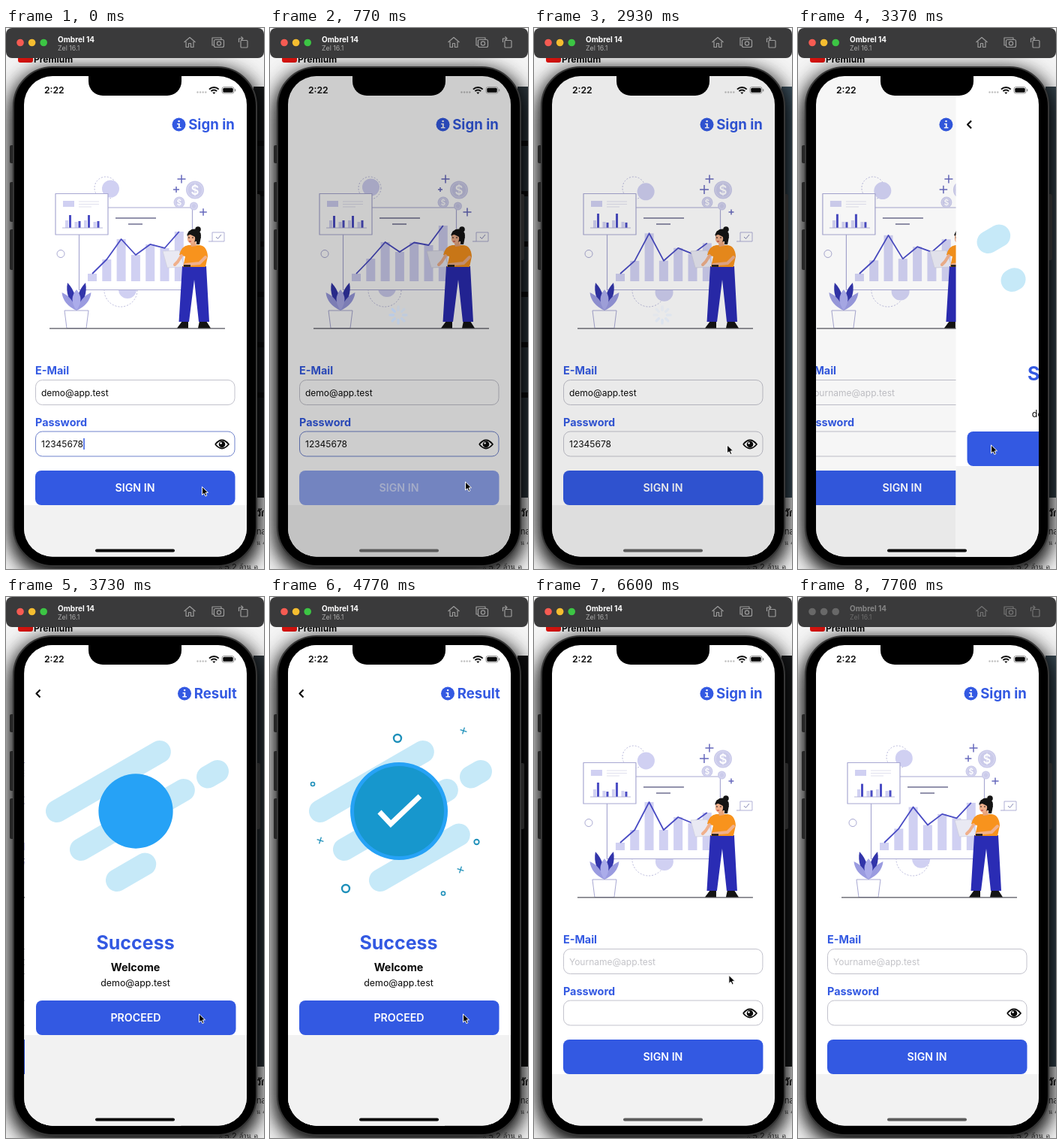
An HTML page with a canvas that plays this animation: 344x720 px, repeating every 7.73 s.

```html
<!DOCTYPE html>
<html lang="en">
<head>
<meta charset="utf-8">
<title>Sign in flow</title>
<style>
html, body { margin: 0; width: 100%; height: 100%; overflow: hidden; background: #e8e8e8; }
canvas { display: block; width: 344px; height: 720px; }
</style>
</head>
<body>
<canvas id="stage"></canvas>
<script>
const W = 344, H = 720, LOOP = 7730;
const SANS = 'Inter, "Noto Sans", sans-serif';
const BLUE = '#3359e2', LINE = '#a8a8d2', LILAC = '#d0d0f2', INDIGO = '#4a4cc4';
const SKY = '#c6e9f8', TEAL = '#1f90ba', INK = '#0a0a0a', PAPER = '#fff';
const PUSH = 3300, POP = 6089;
const canvas = document.getElementById('stage');
const c = canvas.getContext('2d');
const dpr = window.devicePixelRatio || 1;
canvas.width = W * dpr;
canvas.height = H * dpr;

const mix = (a, b, p) => a + (b - a) * p;
const linear = (t, a, b) => Math.max(0, Math.min(1, (t - a) / (b - a)));
const span = (t, a, b) => { const p = linear(t, a, b); return p * p * (3 - 2 * p); };
const dip = (t, a, b) => span(t, a, a + 160) - span(t, b, b + 250);
// critically damped spring, stiffness 1000 and mass 3
const spring = ms => { const k = Math.max(0, ms) / 1000 * Math.sqrt(1000 / 3); return 1 - (1 + k) * Math.exp(-k); };

function paint(fill, stroke, width = 1) {
  if (fill) { c.fillStyle = fill; c.fill(); }
  if (stroke) { c.strokeStyle = stroke; c.lineWidth = width; c.stroke(); }
}
function poly(pts, fill, stroke, width) {
  c.beginPath();
  pts.forEach(p => c.lineTo(p[0], p[1]));
  if (fill) c.closePath();
  paint(fill, stroke, width);
}
function rect(x, y, w, h, fill) {
  c.fillStyle = fill;
  c.fillRect(x, y, w, h);
}
function box(x, y, w, h, r, fill, stroke, width) {
  c.beginPath();
  c.roundRect(x, y, w, h, r);
  paint(fill, stroke, width);
}
function oval(x, y, rx, ry, fill) {
  c.beginPath();
  c.ellipse(x, y, rx, ry, 0, 0, 7);
  paint(fill);
}
function disc(x, y, r, fill, stroke, width) {
  c.beginPath();
  c.arc(x, y, Math.max(0, r), 0, 7);
  paint(fill, stroke, width);
}
function line(x1, y1, x2, y2, color, width = 1) {
  poly([[x1, y1], [x2, y2]], null, color, width);
}
function text(s, x, y, size, color, weight = 400, align = 'left') {
  c.font = `${weight} ${size}px ${SANS}`;
  c.fillStyle = color;
  c.textAlign = align;
  c.fillText(s, x, y);
}
function cross(x, y, r, color, width, turn = 0) {
  c.save();
  c.translate(x, y);
  c.rotate(turn);
  line(-r, 0, r, 0, color, width);
  line(0, -r, 0, r, color, width);
  c.restore();
}
function shifted(x, alpha, body) {
  c.save();
  c.translate(x, 0);
  c.globalAlpha *= alpha;
  body();
  c.restore();
}

function desktop(t) {
  rect(0, 0, W, H, '#f4f4f4');
  const light = 18 + 16 * Math.sin((t - 600) / 1035);
  rect(330, 78, 14, 547, `hsl(203,${light * .7}%,${light}%)`);
  if (t < 1300) for (let y = 150; y < 500; y += 67) rect(330, y, 14, 7, '#0c0c0c');
  box(16, 26, 20, 20, 3, '#d8140f');
  text('Premium', 37, 46, 12, INK, 700);
  text('วัก', 333, 650, 14, INK, 700);
  text('na', 334, 674, 11, '#333');
  text('น 4', 334, 688, 9, '#555');
  text('ะ 5.2 ล้าน ค', 284, 721, 11, '#333');
  c.save();
  c.shadowColor = 'rgba(0,0,0,.85)';
  c.shadowBlur = 28 * dpr;
  c.shadowOffsetY = 8 * dpr;
  box(10, 52, 324, 664, 52, '#000');
  box(10, 52, 324, 664, 52, '#000');
  c.restore();
  [[156, 24], [205, 53], [268, 54]].forEach(([y, h]) => box(5, y, 6, h, 2, '#262626'));
  box(333, 221, 6, 88, 2, '#262626');
  box(10, 52, 324, 664, 52, '#000', '#363636', 2);
}

function titleBar(t) {
  const active = t < 7450;
  const icon = active ? '#9c9c9c' : '#747474';
  const stroke = pts => poly(pts, null, icon, 1.2);
  box(0, 0, W, 40, 8, '#3a3a3b');
  ['#f65b52', '#f5bd30', '#3cc544'].forEach((col, i) => disc(19 + i * 15.6, 19.5, 4.8, active ? col : '#686868'));
  text('Ombrel 14', 69, 18.5, 10, active ? '#fff' : '#868686', 700);
  text('Zel 16.1', 69, 30, 8.8, active ? '#ababab' : '#6c6c6c');
  c.lineJoin = 'round';
  stroke([[237.5, 19], [245, 12.5], [252.5, 19]]);
  stroke([[240, 18], [240, 25.5], [243.5, 25.5], [243.5, 20.5], [246.5, 20.5], [246.5, 25.5], [250, 25.5], [250, 18]]);
  stroke([[277, 23], [275, 23], [275, 13], [287, 13], [287, 15]]);
  box(277.5, 15.5, 13, 10, 2, null, icon, 1.2);
  disc(284, 20.5, 2.6, null, icon, 1.2);
  box(313, 16.5, 9, 9.5, 1, null, icon, 1.2);
  stroke([[310.5, 19], [310.5, 14], [315, 14]]);
  stroke([[313.5, 11.5], [316, 14], [313.5, 16.5]]);
}

function page(foot) {
  rect(24, 60, 298, 650, PAPER);
  rect(24, foot, 298, 710 - foot, '#f2f2f2');
}

function heading(s, x) {
  disc(x, 128.5, 9, BLUE);
  rect(x - 1, 123, 2.2, 2.2, PAPER);
  rect(x - 2.4, 127, 3.4, 1.4, PAPER);
  rect(x - .6, 127, 1.8, 6, PAPER);
  rect(x - 2.6, 132, 5.6, 1.4, PAPER);
  text(s, x + 12.7, 135, 18.6, BLUE, 700);
}

function button(s, y, alpha) {
  shifted(0, alpha, () => {
    box(39, y, 266.5, 46, 8, BLUE);
    text(s, 172, y + 28, 14.2, PAPER, 600, 'center');
  });
}

function field(label, y, color, value, ink) {
  text(label, 39, y - 7, 14.4, BLUE, 700);
  box(39.5, y + .5, 265.5, 33, 9, null, color);
  text(value, 47, y + 21.5, 12, ink);
}

// a leaf grows from the pot at (94, 376)
function leaf(dx, dy, w, fill) {
  const n = Math.hypot(dx, dy), mx = 94 + dx * .6, my = 376 + dy * .55;
  const nx = -dy / n * w, ny = dx / n * w;
  c.beginPath();
  c.moveTo(94, 376);
  c.quadraticCurveTo(mx + nx, my + ny, 94 + dx, 376 + dy);
  c.quadraticCurveTo(mx - nx, my - ny, 94, 376);
  paint(fill);
}

function coin(x, y, r, sign) {
  disc(x, y, r, '#cbcbea');
  disc(x, y, r - 2, null, '#dedef4', .8);
  if (sign) text('$', x, y + r * .5, r * 1.4, PAPER, 600, 'center');
}

function person() {
  const skin = '#f0b08c', black = '#141414';
  poly([[209, 297], [231, 296], [238, 318], [215, 319]], '#e9e9f3', '#cfcfdf', .8);
  poly([[228, 399.5], [235, 390], [243, 390], [243, 399.5]], black);
  poly([[256, 399.5], [258, 390], [267, 390], [273, 399.5]], black);
  poly([[235, 317], [267, 317], [271, 391], [257, 391], [251, 335], [244, 391], [230.5, 391]], '#2a2cb4');
  c.beginPath();
  c.moveTo(243, 289);
  c.lineTo(258, 289);
  c.quadraticCurveTo(268, 290, 269, 304);
  c.lineTo(266, 318);
  c.lineTo(236, 318);
  c.lineTo(239, 304);
  c.lineTo(231, 302);
  c.quadraticCurveTo(234, 290, 243, 289);
  paint('#f8931d');
  c.lineCap = 'round';
  poly([[234, 303], [229, 311], [225, 315]], null, skin, 4);
  poly([[266, 305], [258, 313], [239, 315]], null, skin, 4);
  c.lineCap = 'butt';
  line(237, 316.5, 246, 316.5, black, 2.5);
  poly([[245, 283], [253, 283], [254, 290], [247, 291]], '#e9a57c');
  disc(256, 268, 3.8, black);
  oval(251, 276, 9, 8.5, black);
  poly([[254, 272], [260, 278], [258, 288], [254, 288]], black);
  oval(247, 280, 5.2, 6.8, skin);
  poly([[241, 276], [244, 270], [256, 273], [252, 278], [246, 275]], black);
  line(243, 279, 245, 279, black);
  line(248, 279, 250, 279, black);
  line(244, 284, 247, 284, '#b33');
}

function chartArt(t) {
  const sway = 1.5 * Math.sin(.34 + t * .0016) - .5;
  c.setLineDash([2, 2]);
  disc(133, 213, 15, null, LINE, .8);
  disc(153, 349, 22, null, LINE, .8);
  c.setLineDash([]);
  disc(139.5 - 5 * sway, 214 - 2 * sway, 11.5, LILAC);
  disc(162 - 6 * sway, 348 - 2 * sway, 12, LILAC);
  box(97.5, 239, 151, 109.5, 0, PAPER, LINE, 1.2);
  line(146, 253, 200, 253, '#6f6f90', 1.3);
  line(163, 261, 182, 261, '#6f6f90', 1.3);

  const heights = [10, 29, 56, 35, 49, 44, 66], gains = [0, 1, -4, 4, 2.5, 4, 8];
  const pts = heights.map((h, i) => [115 + i * 19.3, 337 - h - gains[i] * sway]);
  pts.forEach(([x, y]) => rect(x - 6, y, 12, 337 - y, LILAC));
  c.lineJoin = 'round';
  poly(pts, null, INDIGO, 1.8);

  box(66, 220.5, 70, 54.5, 0, PAPER, LINE, 1.2);
  rect(76, 230, 15, 8, LILAC);
  for (let i = 0; i < 3; i++) line(97, 231 + i * 3.5, i < 2 ? 124 : 114, 231 + i * 3.5, '#d9d9ea', .8);
  for (let i = 0; i < 4; i++) {
    const x = 79 + i * 12.5, h = i % 2 ? 9 + sway : 17 - sway;
    rect(x, 256 + i % 2 * 2, 4, 10 - i % 2 * 2, LILAC);
    rect(x + 5, 266 - h, 3, h, INDIGO);
  }
  line(75, 266, 129, 266, LINE, .8);

  coin(252, 215.5, 12, true);
  coin(231, 232, 7.5, true);
  coin(250.5, 237, 5.5, false);
  cross(234, 201, 5.5, '#6668bc', 1.5);
  cross(227, 215, 4 - sway, '#6668bc', 1.5);
  cross(263, 245, 4.8 + sway * .7, '#6668bc', 1.5);
  disc(73, 300.5, 5, null, LINE);
  box(275, 272, 16, 12, 0, null, LINE, .9);
  line(270, 284, 275, 284, LINE);
  poly([[280, 278], [282.5, 280.5], [287, 275]], null, '#8486b4');

  for (const side of [-1, 1]) {
    leaf(side * 12, -37, 9, '#3234aa');
    leaf(side * 19.5, -24, 8, '#9a9be0');
  }
  leaf(0, -28, 11, '#abacea');
  poly([[78, 376], [110, 376], [107, 399.5], [81, 399.5], [78, 376]], PAPER, LINE);
  line(58, 399.8, 292, 399.8, '#55555e', 1.2);
  person();
}

function eye() {
  c.beginPath();
  c.moveTo(279, 554);
  c.quadraticCurveTo(288, 543, 297, 554);
  c.quadraticCurveTo(288, 565, 279, 554);
  paint(null, INK, 1.8);
  disc(288, 554, 4.3, INK);
  disc(286.6, 552.6, 1.3, PAPER);
}

function signIn(t) {
  const filled = t < PUSH, focused = t < 1000;
  page(635);
  heading('Sign in', 230.5);
  chartArt(t);
  field('E-Mail', 468, '#c2c2cc', filled ? 'demo@app.test' : 'Yourname@app.test', filled ? INK : '#c3c3c8');
  field('Password', 536.5, focused ? '#6f82cc' : '#c2c2cc', filled ? '12345678' : '', INK);
  if (t < 500) line(104, 546, 104, 561, BLUE, 1.5);
  eye();
  button('SIGN IN', 589, 1 - .45 * dip(t, 590, 860));
}

// slanted pill that grows from its lower left end
function pill(x, y, length, p) {
  if (p <= 0) return;
  c.lineCap = 'round';
  line(x, y, x + length * .866 * p, y - length * .5 * p, SKY, 30);
  c.lineCap = 'butt';
}

function successArt(t) {
  const age = t - PUSH;
  pill(67, 285, 158, span(age, 0, 350));
  pill(99, 336, 158, span(age, 40, 390));
  pill(268, 239.5, 15, span(age, 100, 400));
  pill(147, 377, 121, span(age, 250, 700));
  disc(172, 285, 65 * span(age, 0, 630), '#26a2f6');
  disc(172, 285, 60 * span(age, 550, 900), '#1797cd');

  const p = linear(age, 850, 1000), q = linear(age, 1000, 1200);
  if (p > 0) {
    const pts = [[146, 286], [146 + 15 * p, 286 + 16 * p]];
    if (q > 0) pts.push([161 + 39 * q, 302 - 37 * q]);
    c.lineJoin = 'miter';
    poly(pts, null, PAPER, 7);
  }
  const pop = span(age, 700, 1100);
  if (pop <= 0) return;
  const place = (x, y) => [mix(172, x, pop), mix(285, y, pop)];
  [[170, 188, 5], [101, 388, 5], [57, 249, 2.5], [231, 394.5, 2.5], [275.5, 326, 3.2]]
    .forEach(([x, y, r]) => disc(...place(x, y), r * pop, null, TEAL, r * .3 + .9));
  [[258, 178], [67, 324], [254, 363]].forEach(([x, y]) => cross(...place(x, y), 4.6 * pop, TEAL, 1.4, .3));
}

function result(t) {
  page(583);
  poly([[44.5, 123.5], [39.5, 128.5], [44.5, 133.5]], null, INK, 2.2);
  heading('Result', 237);
  successArt(t);
  text('Success', 171.5, 469, 25, BLUE, 700, 'center');
  text('Welcome', 171.5, 497.5, 14.4, INK, 700, 'center');
  text('demo@app.test', 171.5, 517.5, 12.4, INK, 400, 'center');
  button('PROCEED', 537, 1 - .45 * dip(t, 5900, 6130));
}

function loading(t) {
  const alpha = span(t, 620, 920) - span(t, 2720, 3020);
  if (alpha <= 0) return;
  rect(24, 60, 298, 650, `rgba(0,0,0,${.39 * alpha})`);
  c.save();
  c.translate(171, 382);
  c.lineCap = 'round';
  const head = Math.floor(t / 100);
  for (let i = 0; i < 8; i++) {
    c.globalAlpha = alpha * (1 - (head + 8 - i) % 8 * .08);
    line(0, -6.5, 0, -11, '#a4c8ff', 3.4);
    c.rotate(Math.PI / 4);
  }
  c.restore();
}

function statusBar(t) {
  box(110, 40, 124, 50, 19, '#000');
  text('2:22', 51, 87, 12.2, INK, 600);
  for (let i = 0; i < 4; i++) disc(255.5 + i * 3.6, 85.5, 1.2, 'rgba(0,0,0,.25)');
  for (const r of [9, 5.5]) {
    c.beginPath();
    c.arc(277.3, 88, r, -Math.PI * .75, -Math.PI * .25);
    paint(null, INK, 2);
  }
  poly([[277.3, 88], [275.2, 85.4], [279.4, 85.4]], INK);
  box(288, 78.5, 16, 8.5, 2.5, null, '#8a8a8a', .9);
  box(289.3, 79.8, 13.4, 5.9, 1.5, INK);
  rect(305, 81.3, 1.3, 3, '#8a8a8a');
  const dark = t < 500 || (t > PUSH && t < 5950);
  box(119, 693.5, 106, 4, 2, dark ? INK : '#5c5c5c');
}

function pointer(t) {
  const x = 261.5 - span(t, 450, 770) - 3 * span(t, 1150, 1600) + 42 * span(t, 6500, 7200);
  const y = 610.5 - 6.5 * span(t, 450, 770) - 49 * span(t, 1150, 1600)
    - 20 * span(t, 5300, 5750) - 560 * span(t, 6500, 7200);
  c.save();
  c.translate(x, y);
  c.lineJoin = 'round';
  poly([[0, 0], [0, 11], [2.6, 8.8], [4.4, 12.6], [6.3, 11.7], [4.6, 8], [8, 7.8]], '#000', '#fff');
  c.restore();
}

function draw(t) {
  c.setTransform(dpr, 0, 0, dpr, 0, 0);
  desktop(t);
  c.save();
  c.beginPath();
  c.roundRect(24, 64, 297, 639.5, 38);
  c.clip();
  const shown = spring(t - PUSH) - spring(t - POP);
  shifted(-89 * shown, 1, () => signIn(t));
  if (shown > .001) {
    rect(24, 60, 298, 650, `rgba(0,0,0,${.1 * shown})`);
    shifted(297 * (1 - shown), 1, () => result(t));
  }
  loading(t);
  statusBar(t);
  c.restore();
  titleBar(t);
  pointer(t);
}

const start = performance.now();
function tick(now) {
  draw(Math.max(0, now - start) % LOOP);
  requestAnimationFrame(tick);
}
draw(0);
requestAnimationFrame(tick);
</script>
</body>
</html>
```
